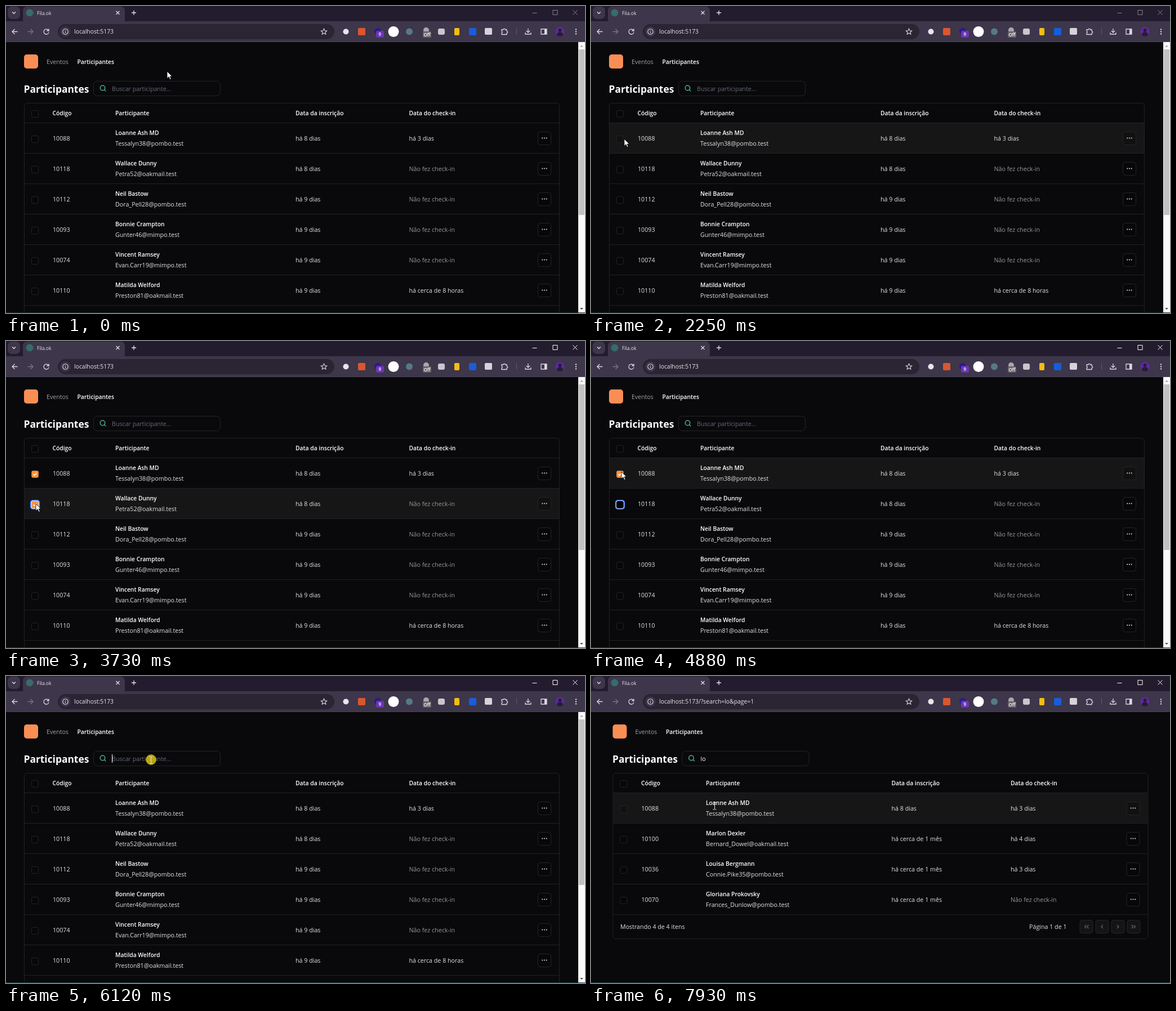
Write an HTML page with a canvas that moves like this. It is 1028 px wide and 545 px high and loops after 8000 ms.

```html
<!DOCTYPE html>
<html lang="pt-BR">
<head>
<meta charset="utf-8">
<title>Fila.ok</title>
<style>
  html, body { margin: 0; width: 100%; height: 100%; overflow: hidden; background: #09090b; }
  canvas { display: block; width: 1028px; height: 545px; }
</style>
</head>
<body>
<canvas id="stage" width="1028" height="545"></canvas>
<script>
const ctx = document.getElementById('stage').getContext('2d', { alpha: false });
const LOOP = 8000;
const FACE = '"Open Sans", "Noto Sans", sans-serif';
const BG = '#09090b', LINE = '#212124', BAR = '#3e364a', STRIP = '#231c2e';
const SOFT = '#e2e2e6', MUTED = '#96969e', ORANGE = '#fb923c', SHADE = 'rgba(0,0,0,.2)';
const NONE = 'Não fez check-in', HOURS = 'há cerca de 8 horas', MONTH = 'há cerca de 1 mês';

const people = {
  loanne: ['10088', 'Loanne Ash MD', 'Tessalyn38@pombo.test', 'há 8 dias', 'há 3 dias'],
  wallace: ['10118', 'Wallace Dunny', 'Petra52@oakmail.test', 'há 8 dias', NONE],
  neil: ['10112', 'Neil Bastow', 'Dora_Pell28@pombo.test', 'há 9 dias', NONE],
  bonnie: ['10093', 'Bonnie Crampton', 'Gunter46@mimpo.test', 'há 9 dias', NONE],
  vincent: ['10074', 'Vincent Ramsey', 'Evan.Carr19@mimpo.test', 'há 9 dias', NONE],
  matilda: ['10110', 'Matilda Welford', 'Preston81@oakmail.test', 'há 9 dias', HOURS],
  karen: ['10085', 'Karen Palmieri I', 'Dalton_Cobb@oakmail.test', 'há 10 dias', NONE],
  alfonso: ['10048', 'Alfonso Wheeler', 'Genevieve.Peters@pombo.test', 'há 11 dias', HOURS],
  marlon: ['10100', 'Marlon Dexler', 'Bernard_Dowel@oakmail.test', MONTH, 'há 4 dias'],
  louisa: ['10036', 'Louisa Bergmann', 'Connie.Pike35@pombo.test', MONTH, 'há 3 dias'],
  gloriana: ['10070', 'Gloriana Prokovsky', 'Frances_Dunlow@pombo.test', MONTH, NONE]
};
const pick = names => names.split(' ').map(n => people[n]);

// Each view: when it appears, column positions, rows.
const views = [
  { from: 0, cols: [194, 514, 715.5], rows: pick('loanne wallace neil bonnie vincent matilda') },
  { from: 7060, cols: [189, 532, 725], rows: pick('loanne wallace neil matilda karen alfonso') },
  { from: 7400, cols: [197.5, 527, 738.5], rows: pick('loanne marlon louisa gloriana'), short: true }
];

// Pointer path: time, x, y
const path = [
  [920, 286, 116], [1060, 262, 99], [1330, 186, 158], [1680, 94, 229], [1760, 94, 229],
  [2000, 72, 245], [2250, 59, 236], [2390, 51, 235], [3050, 51, 235], [3480, 53, 289],
  [4340, 53, 289], [4730, 54, 232], [5160, 54, 232], [5630, 142, 190], [5700, 142, 190],
  [6050, 257, 149], [7400, 258, 149], [7660, 288, 252], [7930, 219, 230]
];
const presses = [[2590, 2720], [3590, 3730], [4190, 4340], [4950, 5100], [6120, 6250]];
const within = (t, a, b) => t >= a && t < b;

function pointerAt(t) {
  const i = path.findIndex(p => p[0] > t);
  if (i === 0) return path[0].slice(1);
  if (i < 0) return path[path.length - 1].slice(1);
  const [t0, x0, y0] = path[i - 1], [t1, x1, y1] = path[i];
  const k = (t - t0) / (t1 - t0);
  return [Math.round(x0 + (x1 - x0) * k), Math.round(y0 + (y1 - y0) * k)];
}

function text(str, x, y, color = SOFT, size = 10.7, weight = 400) {
  ctx.font = `${weight} ${size}px ${FACE}`;
  ctx.fillStyle = color;
  ctx.fillText(str, x, y);
}
const strong = (str, x, y) => text(str, x, y, '#fff', 10.3, 600);

function rect(x, y, w, h, color) {
  ctx.fillStyle = color;
  ctx.fillRect(x, y, w, h);
}
function box(x, y, w, h, r, fill, stroke) {
  ctx.beginPath();
  ctx.roundRect(x, y, w, h, r);
  paint(fill, stroke);
}
function disc(x, y, r, fill, stroke, width) {
  ctx.beginPath();
  ctx.arc(x, y, r, 0, Math.PI * 2);
  paint(fill, stroke, width);
}
function paint(fill, stroke, width = 1) {
  if (fill) { ctx.fillStyle = fill; ctx.fill(); }
  if (stroke) { ctx.strokeStyle = stroke; ctx.lineWidth = width; ctx.stroke(); }
}
// SVG path data drawn at an offset
function icon(d, x, y, stroke, width = 1.3, fill) {
  ctx.save();
  ctx.translate(x, y);
  const shape = new Path2D(d);
  if (fill) { ctx.fillStyle = fill; ctx.fill(shape); }
  if (stroke) {
    ctx.strokeStyle = stroke;
    ctx.lineWidth = width;
    ctx.stroke(shape);
  }
  ctx.restore();
}

function drawTabs(focused) {
  rect(0, 0, 1028, 28, STRIP);
  box(3, 1, 22, 22, 7, BAR);
  icon('M-3 -1.5L0 1.5L3 -1.5', 14, 12, '#e6e1ea');
  box(30, 1, 181, 30, 7, BAR);
  disc(42, 12, 6.5, '#376b6d');
  text('Fila.ok', 55, 15.5, '#e9e5ed', 8.6);
  icon('M-3 -3L3 3M3 -3L-3 3', 198.5, 12, '#e6e1ea', 1.2);
  icon('M-4 0H4M0 -4V4', 227, 12, '#e6e1ea', 1.3);
  const c = focused ? '#fff' : '#87828d';
  icon('M-4 0H4', 938.5, 12.5, c, 1);
  icon('M-4 -4H4V4H-4Z', 975, 11.5, c, 1);
  icon('M-4 -4L4 4M4 -4L-4 4', 1010.5, 11.5, c, 1);
}

function drawExtensions() {
  disc(603.5, 45.5, 5, '#e8e5eb');
  box(625, 39, 13, 13, 2, '#d9572f');
  disc(660, 45, 6, '#2b1a8c');
  box(657, 44, 14, 12, 3, '#6d35b5');
  text('9', 661.5, 53, '#fff', 8, 600);
  disc(688, 45.5, 9.5, '#fff');
  disc(716, 45.5, 6, '#557a86');
  disc(746, 43, 5, '#aaa6ae');
  box(740, 45, 15, 11, 2, '#66636b');
  text('Off', 741.5, 53.5, '#fff', 8, 600);
  box(767, 40, 12, 11, 3, '#c9c6cd');
  box(796, 39, 9, 13, 2, '#f2bd12');
  box(822, 39, 13, 13, 2, '#175ddc');
  box(850, 39, 13, 12, 2, '#d5d2dc');
}

function drawToolbar(query) {
  const c = '#dcd7e1';
  rect(0, 27, 1028, 37, BAR);
  rect(0, 63, 1028, 1, '#4b4357');
  icon('M5 0H-4.5M0 -4.5L-4.5 0L0 4.5', 15.5, 45.5, c);
  icon('M-5 0H4.5M0 -4.5L4.5 0L0 4.5', 43.5, 45.5, '#7b7484');
  icon('M4 -2A4.5 4.5 0 1 0 4.5 1M4.5 -5V-1.5H1', 71.5, 45.5, c);
  box(92, 32, 491, 27, 13.5, '#2a2433');
  disc(105.5, 45.5, 9, BAR);
  disc(105.5, 45.5, 4.7, null, c, 1.1);
  rect(105, 45, 1, 3, c);
  rect(105, 43, 1, 1, c);
  text('localhost:5173' + (query && `/?search=${query}&page=1`), 121, 49, '#e9e5ed', 10.4);
  icon('M0 -5.2L1.5 -1.7L5.2 -1.4L2.4 1L3.3 4.7L0 2.7L-3.3 4.7L-2.4 1L-5.2 -1.4L-1.5 -1.7Z', 564.5, 45.5, c, 1.1);
  drawExtensions();
  icon('M-5 -3.5H-2A1.7 1.7 0 0 1 1.4 -3.5H4V-.8A1.7 1.7 0 0 1 4 2.6V5H-5V2.5A1.7 1.7 0 0 0 -5 -.8Z', 885, 45.5, c);
  rect(906, 39, 1, 12, '#5f5769');
  icon('M0 -5V2M-3.2 -1L0 2.2L3.2 -1M-5 2V5H5V2', 927, 45, c);
  icon('M-5 -4.5H5V4.5H-5Z', 955, 45.5, c);
  rect(956, 41, 4, 9, c);
  disc(983.5, 45.5, 8.3, '#5a2aa0');
  disc(983.5, 43, 3, '#2a1b30');
  icon('M-5.5 6A5.5 5.5 0 0 1 5.5 6A8 8 0 0 1 -5.5 6Z', 983.5, 45.5, null, 1, '#2a1b30');
  for (const dy of [-4, 0, 4]) disc(1012, 45.5 + dy, 1.2, c);
}

function drawCheckbox(y, checked, ring) {
  if (ring) {
    box(42.7, y - 8.8, 17.6, 17.6, 5, '#2563eb');
    box(44.2, y - 7.3, 14.6, 14.6, 4, '#fff');
  }
  if (checked) {
    box(45.2, y - 6.3, 12.6, 12.6, 3, ORANGE);
    icon('M-3 0L-1 2L3 -2', 51.5, y, '#fff', 1.6);
  } else {
    box(45.5, y - 6, 12, 12, 2.5, ring ? '#050506' : SHADE, ring ? '#050506' : '#222225');
  }
}

function drawRow(person, i, cols, state) {
  const top = 208 + i * 54;
  const [code, name, mail, joined, checkin] = person;
  if (state.hover === i) rect(33, top, 949, 53, '#161617');
  rect(33, top + 53, 949, 1, LINE);
  drawCheckbox(top + 28.5, state.checked[i], state.ring === i);
  text(code, 83, top + 30.5);
  strong(name, cols[0], top + 21);
  text(mail, cols[0], top + 40);
  text(joined, cols[1], top + 30.5);
  text(checkin, cols[2], top + 30.5, checkin === NONE ? MUTED : SOFT);
  box(944.5, top + 15.5, 23, 23, 4, SHADE, '#242427');
  for (const dx of [-3.7, 0, 3.7]) disc(956 + dx, top + 26.5, 1, '#e6e6ea');
}

function drawFooter() {
  text('Mostrando 4 de 4 itens', 45.5, 449);
  text('Página 1 de 1', 771.5, 449);
  const left = x => `M${x} -3L${x - 3} 0L${x} 3`, right = x => `M${x} -3L${x + 3} 0L${x} 3`;
  [left(0) + left(4), left(1.5), right(-1.5), right(-4) + right(0)].forEach((d, i) => {
    box(861.5 + i * 28, 433.5, 23, 23, 4, '#141416', '#262629');
    icon(d, 873 + i * 28, 445, '#68686f', 1.1);
  });
}

function drawSearch(t, query) {
  box(155.5, 133.5, 225, 26, 6, null, '#242427');
  disc(171.5, 145.5, 4.3, null, '#5fcfa6', 1.2);
  icon('M0 0L2.7 2.7', 174.6, 148.6, '#5fcfa6', 1.2);
  text(query || 'Buscar participante...', 188, 150.5, query ? '#fff' : '#656a7c');
  const since = t >= 7190 ? 7190 : t >= 6920 ? 6920 : 6120;
  if (t >= 6120 && (t - since) % 1060 < 530) {
    rect(Math.floor(188 + (query ? ctx.measureText(query).width : 0)), 139, 1, 15, '#fff');
  }
}

function drawPage(t, view, query, state) {
  ctx.save();
  ctx.beginPath();
  ctx.rect(0, 64, 1028, 480);
  ctx.clip();
  rect(0, 64, 1028, 481, BG);
  if (view.short) ctx.translate(6.5, 0);
  box(32, 86, 25, 25, 5, '#f98e55');
  text('Eventos', 72, 102.5, '#a1a1aa', 10.6);
  strong('Participantes', 126.5, 102.5);
  text('Participantes', 31.5, 153.5, '#fff', 17.4, 700);
  drawSearch(t, query);
  rect(33, 207, 949, 1, LINE);
  drawCheckbox(191.5);
  strong('Código', 82.5, 194);
  ['Participante', 'Data da inscrição', 'Data do check-in'].forEach((h, i) => strong(h, view.cols[i], 194));
  view.rows.forEach((p, i) => drawRow(p, i, view.cols, state));
  if (view.short) drawFooter();
  box(32.5, 172.5, 950, view.short ? 294 : 400, 5, null, LINE);
  ctx.restore();
}

function drawScrollbar() {
  rect(1016, 64, 12, 480, '#fafafa');
  rect(1017, 77, 10, 294, '#c1c1c1');
  icon('M-3 1.5L0 -1.5L3 1.5Z', 1022, 71, null, 1, '#a3a3a3');
  icon('M-3 -1.5L0 1.5L3 -1.5Z', 1022, 537.5, null, 1, '#505050');
}

function drawPointer(t, x, y) {
  if (presses.some(([a, b]) => within(t, a, b))) disc(x + .5, y - .5, 9.3, 'rgba(228,204,20,.8)');
  const overSearch = x > 156 && x < 380 && y > 133 && y < 160;
  const overName = t > 7400 && x > 203 && x < 325 && y > 218 && y < 254;
  if (overSearch || overName) {
    icon('M-3 -6.5H-1L0 -6L1 -6.5H3M0 -6V6M-3 6.5H-1L0 6L1 6.5H3', x + .5, y + .5, '#e4e4e4', 1);
  } else {
    icon('M0 0V12.5L3 9.7L5.2 14.5L7.2 13.6L5.1 9H9Z', x, y, '#000', .8, '#fff');
  }
}

function draw(t) {
  const query = t < 6920 ? '' : t < 7190 ? 'l' : 'lo';
  const view = views.filter(v => t >= v.from).pop();
  const [x, y] = pointerAt(t);
  const focused = t >= 2590;
  const state = {
    hover: Math.floor((y - 208) / 54),
    checked: [within(t, 2720, 5100), within(t, 3730, 4340)],
    ring: within(t, 3590, 4950) ? 1 : within(t, 2590, 6120) ? 0 : -1
  };
  drawTabs(focused);
  drawToolbar(query);
  drawPage(t, view, query, state);
  if (!view.short) drawScrollbar();
  rect(0, 544, 1028, 1, focused ? '#17404a' : '#1d2b30');
  drawPointer(t, x, y);
}

const start = performance.now();
function tick() {
  draw((performance.now() - start) % LOOP);
  requestAnimationFrame(tick);
}
tick();
</script>
</body>
</html>
```
